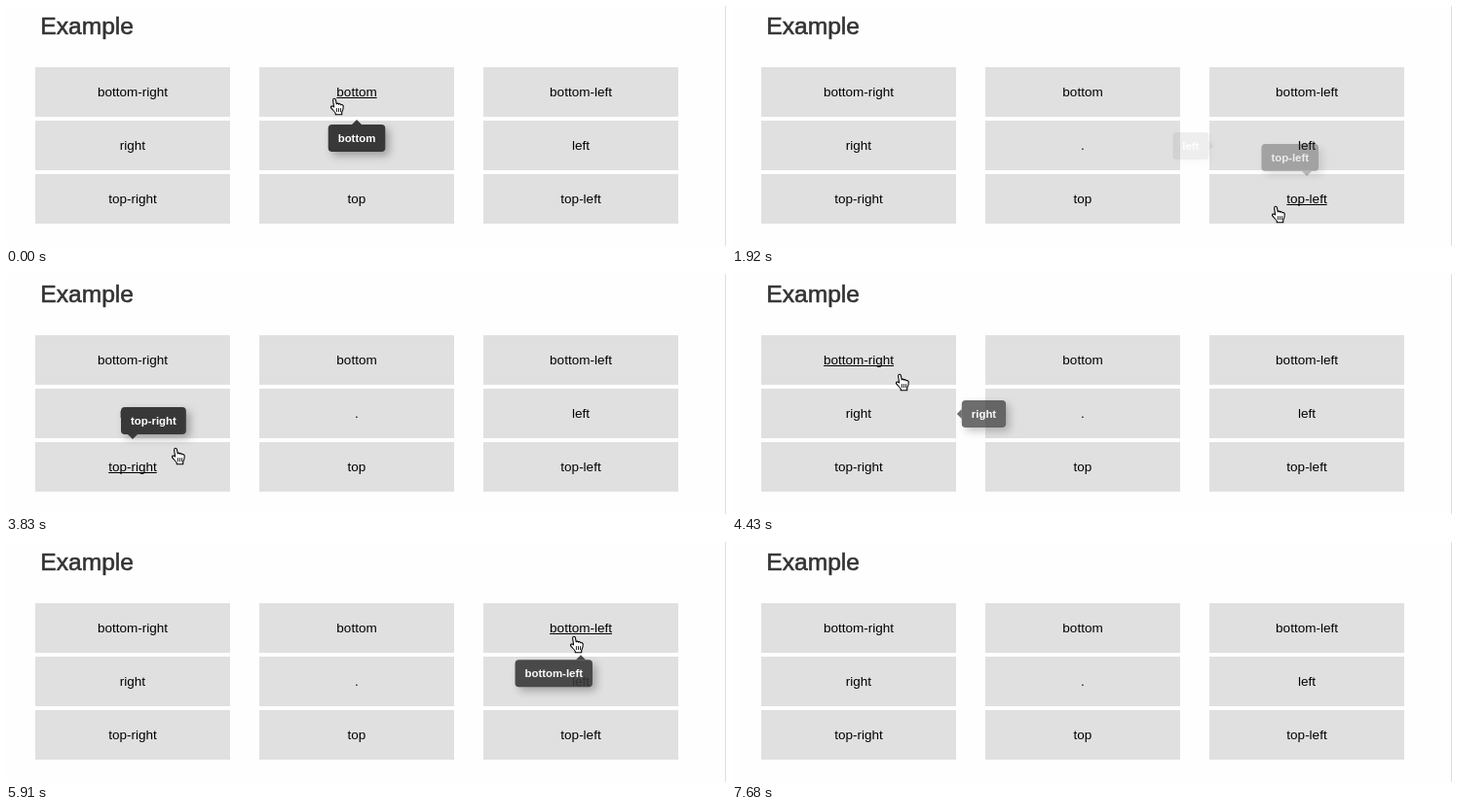
These frames come from a looping animation (739x247 px, 7.98 s). An HTML page:

```html
<!DOCTYPE html>
<html lang="en">
<head>
<meta charset="utf-8">
<title>Tooltip directions</title>
<style>
  html, body { margin: 0; width: 100%; height: 100%; overflow: hidden; background: #fefefe; }
  svg { display: block; }
  text { font-family: "Liberation Sans", Arial, sans-serif; }
  .label { font-size: 13.5px; text-anchor: middle; }
  .tip text { font-size: 11.4px; font-weight: bold; fill: #fff; }
  .tip rect { filter: drop-shadow(4px 4px 4px rgba(0, 0, 0, .3)); }
</style>
</head>
<body>
<svg id="stage" width="739" height="247" viewBox="0 0 739 247">
  <rect width="739" height="247" fill="#fefefe"/>
  <rect x="738" width="1" height="247" fill="#ddd"/>
  <text x="35.3" y="28.5" font-size="24.6" fill="#333" stroke="#333" stroke-width=".6">Example</text>
  <g id="cells"></g>
  <g id="tips"></g>
  <g id="cursor" stroke="#000" stroke-linejoin="round" stroke-linecap="round">
    <path fill="#fff" d="M3.8 8.8 L2.9 2.4 C2.8 .3 5.1 .2 5.5 2 L6.2 6 C6.5 4.9 8 5 8.3 6.2 C8.8 5.3 10.2 5.6 10.5 6.8 C11.2 6.1 12.6 6.6 12.7 8 C12.9 11 12.2 12.4 11.3 14 V16 H5.3 V14.6 C4.2 13 2.3 11.2 1 9.4 C.4 8 2.4 7.2 3.8 8.8Z"/>
    <path fill="none" stroke-width=".8" d="M6.4 10.2V13.2M8.3 10.2V13.2M10.2 10.2V13.2"/>
  </g>
</svg>
<script>
const LOOP = 7980, STEP = 147.7, STEP_LEAD = 16, LAST_STEP = 52;
const FADE = 300, SHOW_DELAY = 120, SLIDE = 8;
const TIP_HEIGHT = 28, ARROW = 5, CELL_WIDTH = 200, CELL_HEIGHT = 51;

const names = [
  ['bottom-right', 'bottom', 'bottom-left'],
  ['right', '.', 'left'],
  ['top-right', 'top', 'top-left'],
];

// pointer moves: departure and arrival (ms), resting place
const moves = [
  [0, 0, 333, 95],
  [60, 820, 538, 89],
  [1034, 1250, 550, 132],
  [1560, 1880, 554, 206],
  [2380, 2770, 366, 212],
  [2830, 3560, 170, 179],
  [3840, 4140, 168, 140],
  [4250, 4480, 168, 98],
  [4600, 4874, 205, 90],
  [4970, 5022, 309, 87],
  [5240, 5840, 579, 97],
  [5960, 6260, 582, 142],
  [6480, 6700, 582, 188],
  [7000, 7533, 624, 252],
];

const $ = id => document.getElementById(id);
const clamp = x => Math.max(0, Math.min(1, x));
const smooth = x => x * x * (3 - 2 * x);

function add(parent, tag, attrs, text = '') {
  const node = document.createElementNS('http://www.w3.org/2000/svg', tag);
  for (const key in attrs) node.setAttribute(key, attrs[key]);
  node.textContent = text;
  return parent.appendChild(node);
}

// cubic-bezier(.25, .1, .25, 1)
function ease(x) {
  if (x <= 0) return 0;
  if (x >= 1) return 1;
  const curve = (s, a, b) => 3 * (1 - s) ** 2 * s * a + 3 * (1 - s) * s * s * b + s ** 3;
  let low = 0, high = 1;
  for (let i = 0; i < 20; i++) {
    const mid = (low + high) / 2;
    if (curve(mid, .25, .25) < x) low = mid; else high = mid;
  }
  return curve(low, .1, 1);
}

function pointerAt(time) {
  let [, , x, y] = moves[0];
  for (const [depart, arrive, toX, toY] of moves.slice(1)) {
    const k = smooth(clamp((time - depart) / (arrive - depart)));
    x += (toX - x) * k;
    y += (toY - y) * k;
  }
  return [x, y];
}

// follows the fingertip through the loop and notes when it is inside a cell
function findHovers(left, top) {
  const hovers = [];
  let current = null;
  for (let time = 0; time < LOOP; time += 3) {
    const [x, y] = pointerAt(time);
    const dx = x + 4 - left, dy = y + 1 - top;
    const inside = dx >= 0 && dx < CELL_WIDTH && dy >= 0 && dy < CELL_HEIGHT;
    if (inside && !current) {
      // the loop opens with the pointer already resting
      current = { enter: time || -LOOP };
      hovers.push(current);
    }
    if (inside) current.leave = time + 3;
    else current = null;
  }
  return hovers;
}

function makeTip(name, cx, cellTop) {
  const [side, align] = name.split('-');
  const dx = { right: 1, left: -1 }[side] || 0;
  const dy = { bottom: 1, top: -1 }[side] || 0;
  const node = add($('tips'), 'g', { class: 'tip' });
  const box = add(node, 'rect', { rx: 4, height: TIP_HEIGHT, fill: '#383838' });
  const arrow = [[-dy, dx], [dy, -dx], [-dx, -dy]].map(([x, y]) => [x * ARROW, y * ARROW]);
  add(node, 'polygon', { points: arrow.join(' '), fill: '#383838' });
  const text = add(node, 'text', {}, name);
  const width = text.getComputedTextLength() + 20;

  let x = -width / 2, y = dy > 0 ? 0 : -TIP_HEIGHT;
  if (align) x = align === 'right' ? -12 : 12 - width;
  if (dx) {
    x = dx > 0 ? 0 : -width;
    y = -TIP_HEIGHT / 2;
  }
  box.setAttribute('x', x);
  box.setAttribute('y', y);
  box.setAttribute('width', width);
  text.setAttribute('x', x + 10);
  text.setAttribute('y', y + 18);

  const anchorX = cx + dx * CELL_WIDTH / 2;
  const anchorY = cellTop + Math.ceil((1 + dy) * CELL_HEIGHT / 2);
  return shown => {
    const slide = SLIDE * shown;
    node.setAttribute('transform', `translate(${anchorX + dx * slide} ${anchorY + dy * slide})`);
    node.setAttribute('opacity', shown);
  };
}

const links = [];
names.forEach((row, r) => row.forEach((name, c) => {
  const left = 30 + 230 * c, top = 63 + 55 * r, cx = left + CELL_WIDTH / 2;
  add($('cells'), 'rect', { x: left, y: top, width: CELL_WIDTH, height: CELL_HEIGHT, fill: '#e0e0e0' });
  const label = add($('cells'), 'text', { class: 'label', x: cx, y: top + 30 }, name);
  if (name === '.') return;
  const width = label.getComputedTextLength();
  links.push({
    underline: add($('cells'), 'rect', { x: cx - width / 2, y: top + 31, width, height: 1 }),
    setTip: makeTip(name, cx, top),
    hovers: findHovers(left, top),
  });
}));

function visibility(time, { enter, leave }) {
  const shown = ease((Math.min(time, leave) - enter - SHOW_DELAY) / FADE);
  return shown * (1 - ease((time - leave) / FADE));
}

function draw(now) {
  // the picture advances in discrete steps
  const step = Math.min(LAST_STEP, Math.floor((now % LOOP + STEP_LEAD) / STEP));
  const time = step * STEP;
  for (const { underline, setTip, hovers } of links) {
    const hovered = hovers.some(({ enter, leave }) => time >= enter && time < leave);
    underline.setAttribute('opacity', hovered ? 1 : 0);
    setTip(Math.max(0, ...hovers.map(hover => visibility(time, hover))));
  }
  const [x, y] = pointerAt(time).map(Math.round);
  $('cursor').setAttribute('transform', `translate(${x - .5} ${y - .5}) scale(1.08)`);
}

const start = performance.now();
function tick() {
  draw(performance.now() - start);
  requestAnimationFrame(tick);
}
tick();
</script>
</body>
</html>
```
